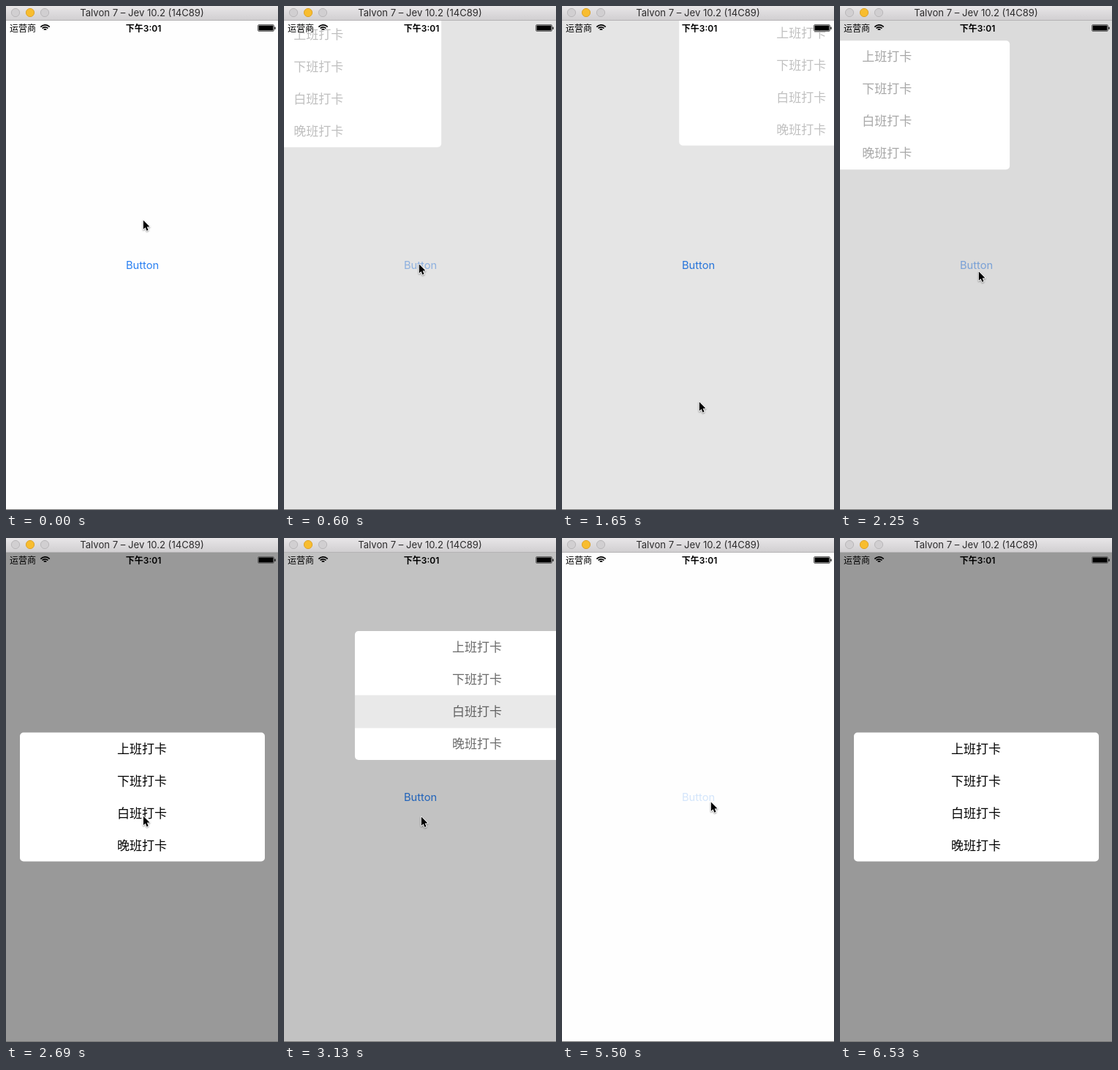
These frames come from a looping animation (372 px wide and 688 px high, 6970 ms). An HTML page with a canvas:

```html
<!DOCTYPE html>
<html lang="zh-CN">
<head>
<meta charset="utf-8">
<title>Popup menu</title>
<style>
  html, body { margin: 0; width: 100%; height: 100%; overflow: hidden; background: #fff; }
  canvas { display: block; width: 372px; height: 688px; }
</style>
</head>
<body>
<canvas id="stage"></canvas>
<script>
const W = 372, H = 688, LOOP = 6970;
const STEP = 148.4;   // the screen refreshes once per step
const SLIDE = 400;    // menu opening or closing
const TRAVEL = 400;   // pointer moving to its next stop
const FADE = 350;     // button returning from its pressed look
const CJK = '"Noto Sans CJK SC", "Noto Sans CJK", sans-serif';
const LATIN = 'Inter, ' + CJK;
const ITEMS = ['上班打卡', '下班打卡', '白班打卡', '晚班打卡'];
const ROW = 44;
const PANEL = { w: 335, h: ROW * ITEMS.length, x: 186.5, y: 353.5 };

const SHOWS = [
  { open: 462, close: 1362 },
  { open: 2068, close: 2939, pick: '白班打卡' },
  { open: 5500, close: Infinity }
];

// The pointer reaches each stop at the given time and rests there.
const STOPS = [
  { at: 0, x: 187, y: 292 },
  { at: 450, x: 184, y: 352 },
  { at: 1180, x: 187, y: 540 },
  { at: 2050, x: 189, y: 362 },
  { at: 2690, x: 187, y: 380 },
  { at: 3700, x: 214, y: 408 },
  { at: 5350, x: 203, y: 360 },
  { at: 6485, x: 367, y: 753 }
];

const canvas = document.getElementById('stage');
const ctx = canvas.getContext('2d');
const dpr = window.devicePixelRatio || 1;
canvas.width = W * dpr;
canvas.height = H * dpr;

const clamp = v => Math.min(1, Math.max(0, v));
const ease = v => { v = clamp(v); return v * v * (3 - 2 * v); };
const mix = (a, b, k) => a + (b - a) * k;

function text(str, x, y, font, color, align = 'center') {
  ctx.font = font;
  ctx.fillStyle = color;
  ctx.textAlign = align;
  ctx.fillText(str, x, y);
}

function rect(x, y, w, h, fill) {
  ctx.fillStyle = fill;
  ctx.fillRect(x, y, w, h);
}

function roundBox(x, y, w, h, r) {
  ctx.beginPath();
  ctx.roundRect(x, y, w, h, r);
}

function light(x, fill, edge) {
  ctx.beginPath();
  ctx.arc(x, 9, 5.6, 0, Math.PI * 2);
  ctx.fillStyle = fill;
  ctx.fill();
  ctx.strokeStyle = edge;
  ctx.lineWidth = 1;
  ctx.stroke();
}

function drawButton(t) {
  const show = SHOWS.find(s => t >= s.open - 100 && t < s.open + FADE);
  ctx.globalAlpha = show ? mix(0.2, 1, ease((t - show.open) / FADE)) : 1;
  text('Button', 186.5, 359, `14.7px ${LATIN}`, '#2a80f2');
  ctx.globalAlpha = 1;
}

// The menu flies in from the top left corner and out to the top right.
function drawMenu(t) {
  const show = SHOWS.find(s => t >= s.open && t < s.close + SLIDE);
  if (!show) return;
  const closing = t >= show.close;
  const k = closing ? 1 - ease((t - show.close) / SLIDE) : ease((t - show.open) / SLIDE);
  const x = mix(closing ? 374 : 0.5, PANEL.x, k);
  const left = x - PANEL.w / 2;
  const top = mix(20.3, PANEL.y, k) - PANEL.h / 2;

  rect(0, 20, W, H - 20, `rgba(0,0,0,${0.4 * k})`);
  ctx.save();
  roundBox(left, top, PANEL.w, PANEL.h, 5);
  ctx.fillStyle = '#fff';
  ctx.fill();
  ctx.clip();
  ctx.globalAlpha = k;
  ITEMS.forEach((item, i) => {
    const y = top + ROW * i;
    if (closing && item === show.pick) rect(left, y - 0.5, PANEL.w, ROW + 1, '#d9d9d9');
    text(item, x - 0.5, y + 28, `17px ${CJK}`, '#000');
  });
  ctx.restore();
}

function drawStatusBar() {
  text('运营商', 5, 34.5, `12px ${CJK}`, '#000', 'left');
  text('下午3:01', 188, 34.5, `600 12px ${LATIN}`, '#000');

  ctx.strokeStyle = '#000';
  ctx.lineWidth = 1.7;
  for (const r of [8.2, 5.2, 2.2]) {
    ctx.beginPath();
    ctx.arc(53.5, 34, r, -Math.PI * 0.77, -Math.PI * 0.23);
    ctx.stroke();
  }

  ctx.strokeStyle = '#666';
  ctx.lineWidth = 1;
  roundBox(344.5, 25.5, 22, 9, 1.5);
  ctx.stroke();
  rect(345.5, 26.5, 20, 7, '#000');
  rect(367.3, 28.6, 1.3, 3.2, '#000');
}

function drawTitleBar() {
  const shade = ctx.createLinearGradient(0, 0, 0, 19);
  shade.addColorStop(0, '#e8e6e8');
  shade.addColorStop(1, '#d1cfd1');
  rect(0, 0, W, 19, shade);
  rect(0, 19, W, 1, '#b5b3b5');
  light(13, '#d1cfd1', '#b9b7b9');
  light(33, '#f8bd2f', '#dda32a');
  light(53, '#d1cfd1', '#b9b7b9');
  text('Talvon 7 – Jev 10.2 (14C89)', 186, 14, `13.1px ${LATIN}`, '#2c2b2c');
}

function drawPointer(t) {
  const i = STOPS.findLastIndex(s => t >= s.at);
  const from = STOPS[i], to = STOPS[i + 1] || from;
  const k = clamp((t - to.at) / TRAVEL + 1);
  const arrow = [[0, 0], [0, 13.6], [3.1, 10.7], [5.2, 15.7], [7.5, 14.7], [5.4, 9.8], [9.6, 9.6]];
  ctx.save();
  ctx.translate(mix(from.x, to.x, k) + 0.8, mix(from.y, to.y, k) + 0.6);
  ctx.scale(0.9, 0.9);
  ctx.beginPath();
  arrow.forEach(p => ctx.lineTo(...p));
  ctx.closePath();
  ctx.shadowColor = 'rgba(0,0,0,0.4)';
  ctx.shadowBlur = 2 * dpr;
  ctx.shadowOffsetY = dpr;
  ctx.strokeStyle = '#fff';
  ctx.lineWidth = 2;
  ctx.lineJoin = 'round';
  ctx.stroke();
  ctx.shadowColor = 'transparent';
  ctx.fillStyle = '#000';
  ctx.fill();
  ctx.restore();
}

function draw(t) {
  ctx.setTransform(dpr, 0, 0, dpr, 0, 0);
  rect(0, 0, W, H, '#fefefe');
  drawButton(t);
  drawMenu(t);
  drawStatusBar();
  drawTitleBar();
  rect(0, 687, W, 1, '#777');
  drawPointer(t);
}

const start = performance.now();
function loop() {
  const t = (performance.now() - start) % LOOP;
  draw(Math.floor(t / STEP) * STEP);
  requestAnimationFrame(loop);
}
loop();
</script>
</body>
</html>
```
